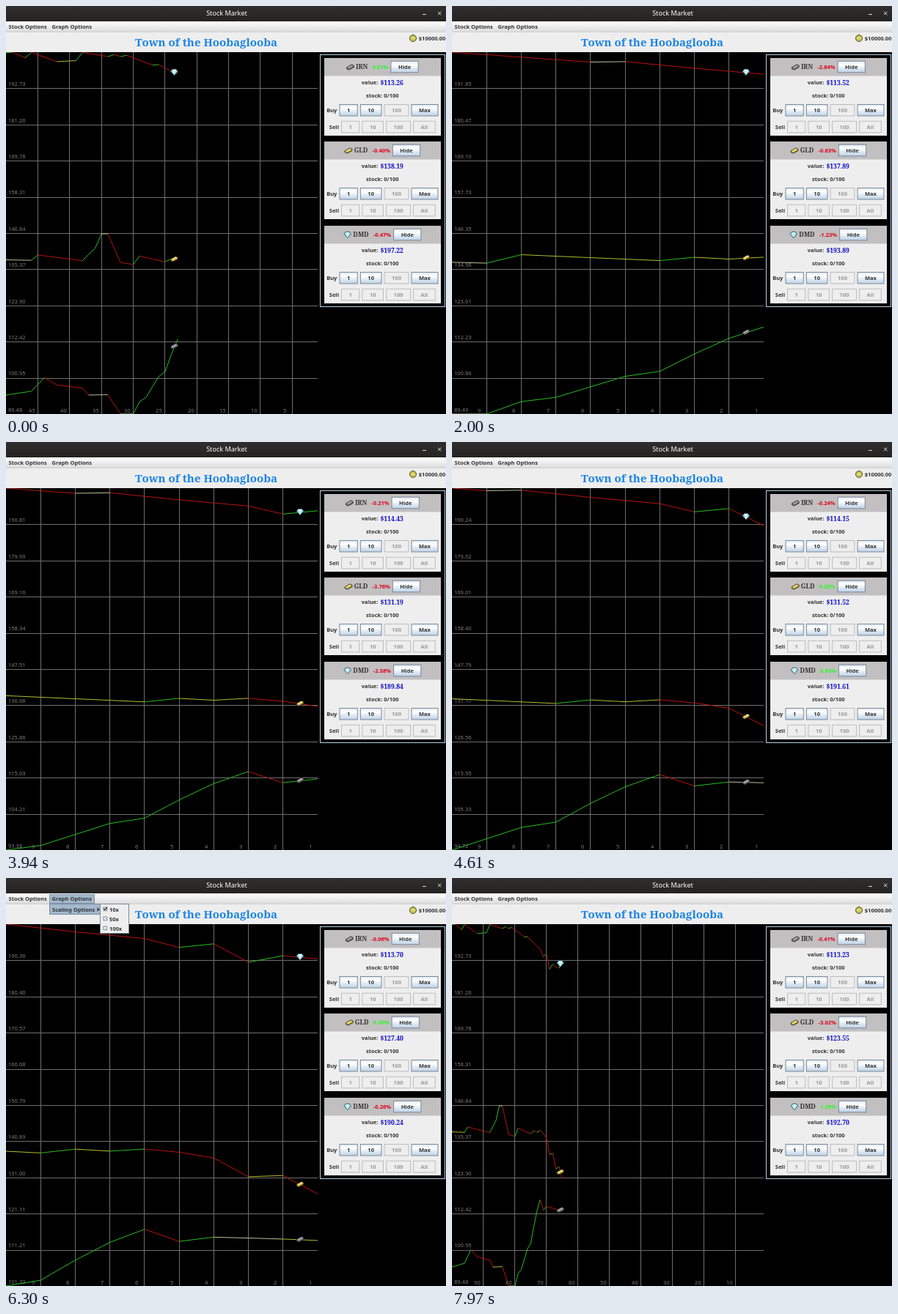
Animation of 600x557 px, one loop 8000 ms. Source, as an HTML page with a canvas:

```html
<!DOCTYPE html>
<html>
<head>
<meta charset="utf-8">
<title>Stock Market</title>
<style>
html, body { margin: 0; width: 100%; height: 100%; overflow: hidden; background: #000; }
canvas { display: block; }
</style>
</head>
<body>
<canvas id="stage" width="600" height="557"></canvas>
<script>
const g = document.getElementById('stage').getContext('2d');
const LOOP = 8000, FIRST_TICK = 170, TICK = 990;
const W = 425, TOP = 63, BOTTOM = 557, H = BOTTOM - TOP;
const SANS = '"Noto Sans", sans-serif', SERIF = '"Noto Serif", serif';
const UI = 'bold 7.5px ' + SANS, AXIS = '7.5px ' + SANS, BIG = 'bold 8.57px ' + SERIF;
const GRID = '#6e6e6e', EDGE = '#7a8a99', PICKED = '#a3b8cc', PANEL = '#eeeeee', INK = '#333';

// Turning points [tick, price] joined by straight lines, then the live prices
function series(points, live) {
  const v = [];
  points.slice(1).forEach(([i2, v2], n) => {
    const [i1, v1] = points[n];
    for (let i = i1; i <= i2; i++) v[i] = v1 + (v2 - v1) * (i - i1) / (i2 - i1);
  });
  return v.concat(live);
}

const stocks = [
  { name: 'IRN', icon: ingot('#77777b', '#a9a9ad'), v: series(
    [[0, 95.5], [4, 96.7], [6, 101], [8, 98.7], [12, 97.7], [13, 95.5], [16, 95.6], [18, 89.48], [20, 89.49],
     [21, 93.38], [22, 94.72], [24, 101.32], [25, 102.9], [26, 108.37]],
    [113.26, 116.84, 113.52, 114.67, 114.43, 114.15, 113.77, 113.7, 113.23]) },
  { name: 'GLD', icon: ingot('#c4aa3a', '#f0e27c'), v: series(
    [[0, 138.36], [4, 138.2], [5, 139.9], [12, 138.1], [14, 142], [15, 146.6], [16, 146.6], [18, 137.5],
     [20, 136.9], [21, 139.55], [25, 137.7], [26, 138.74]],
    [138.19, 138.77, 137.89, 136.32, 131.19, 131.52, 126.51, 127.4, 123.55]) },
  { name: 'DMD', icon: diamond, v: series(
    [[0, 204], [1, 204.2], [3, 202.4], [4, 204.1], [8, 201.2], [11, 201.5], [12, 204.1], [16, 202.8],
     [17, 203.4], [18, 202.8], [19, 203.22], [22, 200.85], [23, 200.1], [24, 200.25], [26, 198.15]],
    [197.22, 196.3, 193.89, 194.87, 189.84, 191.61, 190.74, 190.24, 192.7]) }
];

const scales = [10, 50, 100];
const visits = [
  { open: 450, sub: 850, pick: 0, close: 1800 },
  { open: 5800, sub: 6100, pick: 2, close: 7200 }
];

function rect(x, y, w, h, fill, border) {
  g.fillStyle = border || fill;
  g.fillRect(x, y, w, h);
  if (border) {
    g.fillStyle = fill;
    g.fillRect(x + 1, y + 1, w - 2, h - 2);
  }
}

function text(s, x, y, font, color, align = 'left') {
  g.font = font;
  g.fillStyle = color;
  g.textAlign = align;
  g.fillText(s, x, y);
}

function width(s, font) {
  g.font = font;
  return g.measureText(s).width;
}

function line(x1, y1, x2, y2, color, w = 1) {
  g.strokeStyle = color;
  g.lineWidth = w;
  g.beginPath();
  g.moveTo(x1, y1);
  g.lineTo(x2, y2);
  g.stroke();
}

function poly(points, fill, stroke) {
  g.beginPath();
  points.forEach(([x, y]) => g.lineTo(x, y));
  g.closePath();
  g.fillStyle = fill;
  g.fill();
  if (stroke) {
    g.strokeStyle = stroke;
    g.lineWidth = 1;
    g.stroke();
  }
}

function ramp(y, h, ...stops) {
  const r = g.createLinearGradient(0, y, 0, y + h);
  stops.forEach((c, i) => r.addColorStop(i / (stops.length - 1), c));
  return r;
}

function at(x, y, draw) {
  g.save();
  g.translate(x, y);
  draw();
  g.restore();
}

function ingot(side, top) {
  return () => {
    poly([[-4.8, 0.5], [2, -3.4], [4.8, -2], [4.8, 0.3], [-1.8, 3.8], [-4.8, 2.4]], side, '#2c2a26');
    poly([[-4, 0.4], [2, -2.9], [4, -1.8], [-1.8, 1.6]], top);
  };
}

function diamond() {
  poly([[-2.5, -4], [2.5, -4], [4.8, -1], [0, 4.5], [-4.8, -1]], '#9fdce2', '#3c5f66');
  poly([[-2.2, -3.4], [2.2, -3.4], [1.6, -0.8], [-1.6, -0.8]], '#e9fcfc');
  poly([[-1.6, -0.6], [1.6, -0.6], [0, 3.6]], '#d2f4f4');
}

// Parts of a centred row: each has a width and draws itself at x
function row(parts) {
  const gap = 3.1;
  let x = 513.3 - (parts.reduce((sum, p) => sum + p.w, 0) + gap * (parts.length - 1)) / 2;
  for (const p of parts) {
    p.draw(x);
    x += p.w + gap;
  }
}

function label(s, y, font = UI, color = INK) {
  return { w: width(s, font), draw: x => text(s, x, y, font, color) };
}

function button(s, y, on) {
  const w = width(s, UI) + 21;
  return { w, draw(x) {
    const fill = on ? ramp(y, 16.5, '#dde8f3', '#ffffff', '#dce7f2', '#b8cfe5') : PANEL;
    rect(x, y, w, 16.5, fill, on ? EDGE : '#bcbcbc');
    text(s, x + w / 2, y + 10.9, UI, on ? INK : '#999', 'center');
  } };
}

function card(stock, i, y) {
  const value = stock.v[i], change = (value / stock.v[i - 1] - 1) * 100;
  rect(434, y, 159, 106, PANEL);
  rect(434, y, 159, 24.5, '#c2bfc0');
  row([
    { w: 10, draw: x => at(x + 5.5, y + 12.3, stock.icon) },
    label(stock.name, y + 15.2, BIG),
    { w: 0, draw() {} },
    label(change.toFixed(2) + '%', y + 14.8, UI, change > 0 ? '#1cff1c' : '#e00018'),
    button('Hide', y + 3.8, true)
  ]);
  row([label('value:', y + 36), label('$' + value.toFixed(2), y + 36.7, BIG, '#0a0ac8')]);
  row([label('stock: 0/100', y + 53.8)]);
  row([label('Buy', y + 74), ...['1', '10', '100', 'Max'].map(s => button(s, y + 63, s !== '100'))]);
  row([label('Sell', y + 96.8), ...['1', '10', '100', 'All'].map(s => button(s, y + 85.8, false))]);
}

function segmentColor(dx, dy) {
  const slope = Math.abs(dy / dx);
  if (slope < 0.032) return '#b9c29a';
  if (slope < 0.06) return '#b4bc30';
  return dy < 0 ? '#28be20' : '#b81212';
}

function graph(i, scale) {
  const last = scale === 10 ? i - 1 : i;
  const start = Math.max(0, last - scale + 1);
  const step = W / (scale - 1), every = Math.max(1, scale / 10);
  const shown = stocks.flatMap(s => s.v.slice(start, last + 1));
  const low = Math.min(...shown), high = Math.max(...shown);
  const px = k => (k - start) * step;
  const py = v => BOTTOM - (v - low) / (high - low) * H;

  g.save();
  g.beginPath();
  g.rect(0, TOP, W, H);
  g.clip();
  for (let k = every; k < scale; k += every) {
    const x = Math.floor(k * step) + 0.5;
    line(x, TOP, x, BOTTOM, GRID);
    text(scale - k, x - 12.4, 554.5, AXIS, '#7c7c7c');
  }
  for (let k = 0; k < 10; k++) {
    const y = BOTTOM - k * H / 10, snapped = Math.round(y) + 0.5;
    line(0, snapped, W, snapped, GRID);
    text((low + (high - low) * k / 10 + 1e-9).toFixed(2), 3, y - 3.2, AXIS, '#7c7c7c');
  }
  for (const { v } of stocks) {
    for (let k = start; k < last; k++) {
      const y1 = py(v[k]), y2 = py(v[k + 1]);
      line(px(k), y1, px(k + 1), y2, segmentColor(step, y2 - y1));
    }
  }
  for (const { v, icon } of stocks) {
    at(px(last - 0.5) - 0.4, (py(v[last - 1]) + py(v[last])) / 2 - 0.8, icon);
  }
  g.restore();
}

function chrome() {
  rect(0, 0, 600, 21, ramp(0, 21, '#302f2d', '#242321'));
  text('Stock Market', 301, 13.2, '9.1px ' + SANS, '#ffffff', 'center');
  line(568, 11.5, 573, 11.5, '#ddd');
  line(589, 7.8, 593.5, 12.2, '#ddd');
  line(593.5, 7.8, 589, 12.2, '#ddd');

  rect(0, 21, 600, 15, ramp(21, 15, '#ffffff', '#dadada'));
  rect(0, 35, 600, 28, PANEL);
  line(0, 35.5, 600, 35.5, '#cfcfcf');
  text('Town of the Hoobaglooba', 273, 55, 'bold 15.05px ' + SERIF, '#1a84e6', 'center');
  g.beginPath();
  g.arc(555, 44, 4.5, 0, 7);
  g.fillStyle = '#c9c552';
  g.fill();
  g.strokeStyle = '#4c4a1c';
  g.lineWidth = 1;
  g.stroke();
  line(552.5, 44, 557.5, 44, '#eeeaa0', 1.6);
  text('$10000.00', 562.8, 46.8, UI, INK);
}

function menus(t, scale) {
  const visit = visits.find(v => t >= v.open && t < v.close);
  if (visit) rect(59, 22, 62, 13, PICKED, '#8296ab');
  text('Stock Options', 3.6, 30.7, UI, INK);
  text('Graph Options', 62.6, 30.7, UI, INK);
  if (!visit) return;

  const deep = t >= visit.sub;
  rect(59, 35, 72, 15, PANEL, EDGE);
  if (deep) rect(60, 36, 70, 13, PICKED);
  text('Scaling Options', 63, 45.6, UI, INK);
  poly([[124.5, 40.2], [127.8, 43], [124.5, 45.8]], INK);
  if (!deep) return;

  const hover = Math.min(visit.pick, Math.floor((t - visit.sub - 300) / 150));
  rect(128, 35, 40, 41, PANEL, EDGE);
  scales.forEach((n, k) => {
    const y = 36 + k * 13;
    if (k === hover) rect(129, y, 38, 13, PICKED);
    rect(132.5, y + 3.6, 5.6, 5.6, '#f4f4f4', EDGE);
    if (n === scale) {
      line(133.5, y + 5.7, 135, y + 7.7, '#222', 1.1);
      line(135, y + 7.7, 138, y + 3.7, '#222', 1.1);
    }
    text(n + 'x', 141, y + 9.6, UI, INK);
  });
}

function draw(t) {
  const i = 28 + Math.floor((t - FIRST_TICK) / TICK);
  const scale = visits.reduce((s, v) => t >= v.close ? scales[v.pick] : s, 50);
  rect(0, 0, 600, 557, '#000');
  graph(i, scale);
  rect(428, 66, 171, 345, '#000', '#b8cfe5');
  stocks.forEach((s, k) => card(s, i, Math.round(71 + k * 114.4)));
  chrome();
  menus(t, scale);
}

const began = performance.now();
function frame() {
  draw((performance.now() - began) % LOOP);
  requestAnimationFrame(frame);
}
frame();
</script>
</body>
</html>
```
